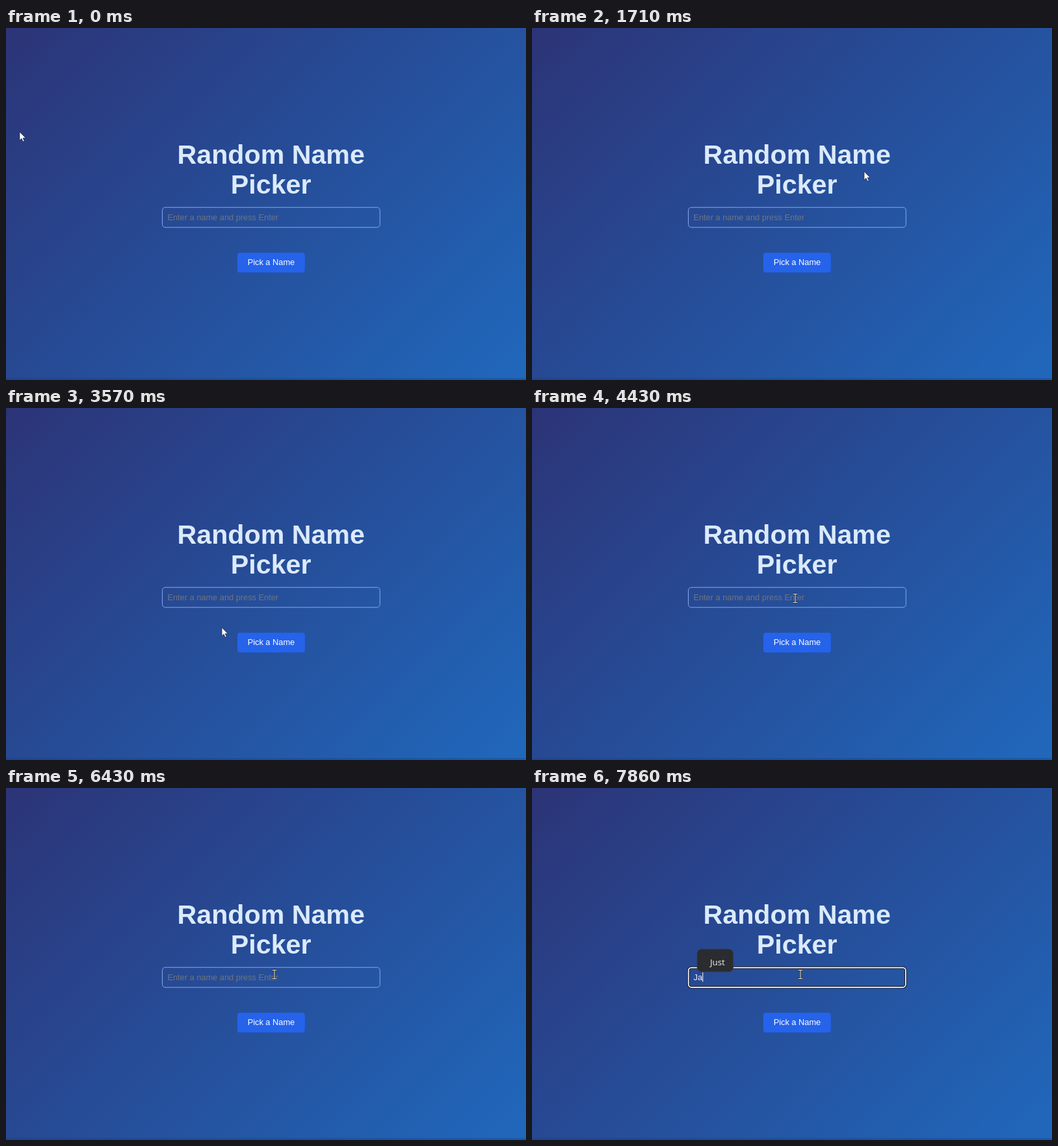
These frames come from a looping animation (800 by 542 pixels, 8000 ms). An HTML page:

```html
<!DOCTYPE html>
<html lang="en">
<head>
<meta charset="utf-8">
<title>Random Name Picker</title>
<style>
  html, body { margin: 0; width: 100%; height: 100%; overflow: hidden; }
  body { background: linear-gradient(135deg, #2c3477, #2068bc); }
  svg { position: absolute; left: 0; top: 0; }
  text { font-family: "Liberation Sans", Arial, sans-serif; font-size: 12.8px; }
  .title { font-size: 41.2px; font-weight: bold; fill: #dbeafe; text-anchor: middle; }
  .button { fill: #fff; text-anchor: middle; }
  .word { font-family: "Open Sans", "Noto Sans", sans-serif; font-size: 13.3px; fill: #f2f2f2; }
  #hint { fill: #70757e; }
  #typed { fill: #eef3ff; }
</style>
</head>
<body>
<svg width="800" height="542" viewBox="0 0 800 542">
  <rect y="539" width="800" height="3" fill="#123a7c" opacity=".3"/>
  <text class="title" x="407.7" y="209.3">Random Name</text>
  <text class="title" x="407.7" y="254.8">Picker</text>

  <rect id="field" x="240.5" y="276.2" width="334.8" height="30.8" rx="4.5" fill="none" stroke="#86a8ee"/>
  <g id="focus" fill="none">
    <rect x="240.7" y="276.6" width="334.2" height="30.2" rx="4.5" stroke="#14161c" stroke-width="3.6"/>
    <rect x="240.7" y="276.6" width="334.2" height="30.2" rx="4.5" stroke="#fff" stroke-width="1.7"/>
  </g>
  <text id="hint" x="248.4" y="295.6">Enter a name and press Enter</text>
  <text id="typed" x="248.6" y="295.6"></text>
  <rect id="caret" y="284" width="1" height="14.5" fill="#fff"/>

  <rect x="356" y="346" width="103.8" height="30.4" rx="4" fill="#2563eb"/>
  <text class="button" x="407.9" y="364.6">Pick a Name</text>

  <g id="popup">
    <rect x="254" y="248" width="55.6" height="35" rx="7" fill="#2b2c2f" stroke="#3b3d42" stroke-width=".8"/>
    <text class="word" x="274" y="272.6">Just</text>
  </g>

  <path id="arrow" d="M0 0V13L3 10.2 5.1 15 7.2 14.1 5.1 9.4H9.2Z" fill="#fff" stroke="#1b2340" stroke-width=".7"/>
  <g id="beam" fill="none">
    <path d="M-4-6.5H4M0-6.5V6.5M-4 6.5H4" stroke="#222a3c" stroke-width="2.6"/>
    <path d="M-3.5-6.5H3.5M0-6.5V6.5M-3.5 6.5H3.5" stroke="#e6e3d2" stroke-width="1.1"/>
  </g>
</svg>
<script>
  const LOOP = 8000, FPS = 7;
  const $ = id => document.getElementById(id);
  const show = (id, on) => $(id).style.display = on ? "" : "none";

  // pointer stops: step, x, y
  const stops = [
    [0, 21, 160], [7, 328, 223], [12, 511, 221], [16, 557, 214],
    [19, 322, 214], [21, 291, 206], [24, 338, 354], [27, 318, 300],
    [31, 405, 293], [32, 405, 293], [36, 283, 291], [39, 541, 300],
    [41, 470, 330], [45, 413, 287], [56, 413, 287]
  ];
  // places where the pointer becomes a text beam: left, top, right, bottom
  const textAreas = [[266, 176, 550, 219], [347, 222, 469, 266], [240, 276, 576, 307]];
  // from step: focused, text, caret x, popup
  const states = [
    [0, false, "", 0, false],
    [49, true, "", 248.6, false],
    [53, true, "J", 255.4, false],
    [54, true, "J", 255.4, true],
    [55, true, "Ja", 262.2, true]
  ];

  function pointerAt(step) {
    const i = Math.max(1, stops.findIndex(s => s[0] >= step));
    const [s0, x0, y0] = stops[i - 1], [s1, x1, y1] = stops[i];
    const p = (step - s0) / (s1 - s0), e = p * (0.5 + p * (1.5 - p));
    return [x0 + (x1 - x0) * e, y0 + (y1 - y0) * e];
  }

  function draw(step) {
    const [x, y] = pointerAt(step);
    const beam = textAreas.some(([l, t, r, b]) => x >= l && x <= r && y >= t && y <= b);
    show("beam", beam);
    show("arrow", !beam);
    $(beam ? "beam" : "arrow").setAttribute("transform", `translate(${x} ${y})`);

    const [, focused, text, caretX, popup] = states.filter(s => s[0] <= step).pop();
    show("field", !focused);
    show("focus", focused);
    show("caret", focused);
    show("hint", !text);
    show("popup", popup);
    $("typed").textContent = text;
    $("caret").setAttribute("x", caretX);
  }

  const start = performance.now();
  function tick(now) {
    const t = Math.max(0, now - start) % LOOP;
    draw(Math.min(55, Math.floor((t + 5) * FPS / 1000)));
    requestAnimationFrame(tick);
  }
  draw(0);
  requestAnimationFrame(tick);
</script>
</body>
</html>
```
